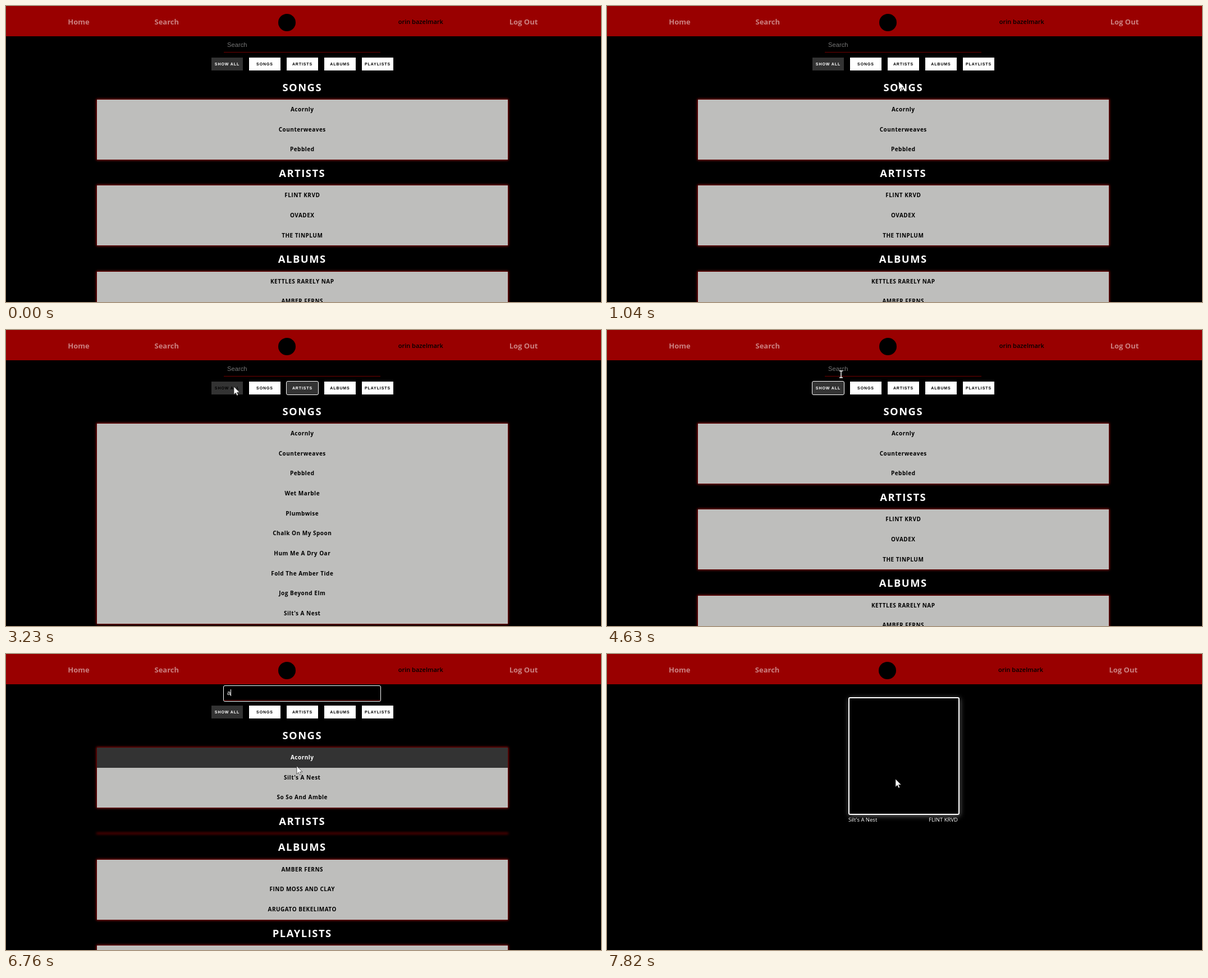
An HTML page for the animation above (8 s loop, 1060 by 528 pixels).

```html
<!DOCTYPE html>
<html lang="en">
<head>
<meta charset="utf-8">
<title>Music search</title>
<style>
  html, body { margin: 0; width: 100%; height: 100%; overflow: hidden; background: #000; }
  #stage { position: relative; width: 1060px; height: 528px; overflow: hidden; background: #000;
    color: #fff; font-family: "Open Sans", "Noto Sans", sans-serif; }
  #stage * { box-sizing: border-box; }
  [hidden] { display: none !important; }
  .abs, nav span, nav i, button, .view, .cursor { position: absolute; white-space: pre; }
  nav { position: absolute; width: 100%; height: 54px; background: #900; }
  nav span { top: 18px; line-height: 20px; font-size: 13px; font-weight: 700; color: rgba(255,255,255,.5); }
  nav .user { font-size: 11px; font-weight: 600; color: #000; }
  nav i { top: 14px; width: 31px; height: 31px; border-radius: 50%; background: #000; }
  #field { left: 388px; top: 57px; width: 279px; height: 27px; padding-left: 6px;
    font: 11.2px/24px "Liberation Sans", Arial, sans-serif; color: #757575; }
  #field::after { content: ""; position: absolute; left: 0; right: 0; top: 25px; height: 1px; background: #700000; }
  #caret { left: 6px; top: 6px; width: 1px; height: 12px; background: #fff; }
  button { top: 92px; width: 56px; height: 23px; padding: 0; border: 0; background: #fff; color: #000;
    font: 700 7px/22px "Liberation Sans", Arial, sans-serif; letter-spacing: .9px; text-align: center; }
  button.hover, button.active { background: #333; }
  button.active { color: #fff; }
  .focus { outline: 1px solid #fff; border-radius: 2px; }
  .view { left: 161.5px; top: 120.67px; width: 732.5px; text-align: center; }
  h2 { margin: 0; height: 46.33px; font-size: 18.4px; line-height: 47px; font-weight: 700; letter-spacing: 1.5px; }
  .list { background: #bebebc; color: #000; box-shadow: 0 0 4px 1px #900; }
  .row { height: 35.67px; line-height: 35.5px; font-size: 10px; font-weight: 700; letter-spacing: .5px; }
  .row.hover { background: #333; color: #fff; }
  #cover { left: 430px; top: 77px; width: 198px; height: 210px; border: 2px solid #fff; border-radius: 3px;
    box-shadow: 1px 2px 10px rgba(255,255,255,.4); }
  .caption { top: 289px; font-size: 9.5px; line-height: 14px; }
  .cursor { left: 0; top: 0; overflow: visible; }
</style>
</head>
<body>
<div id="stage">
  <nav>
    <span data-x="110.3">Home</span>
    <span data-x="264.5">Search</span>
    <i data-x="485"></i>
    <span class="user" data-x="698.7">orin bazelmark</span>
    <span data-x="896.7">Log Out</span>
  </nav>
  <div id="browse">
    <div id="field" class="abs"><span id="query">Search</span><b id="caret" class="abs"></b></div>
  </div>
  <div id="song">
    <div id="cover" class="abs"></div>
    <span class="abs caption" style="left:430px">Silt's A Nest</span>
    <span class="abs caption" style="right:435px">FLINT KRVD</span>
  </div>
  <svg id="arrow" class="cursor" width="12" height="18">
    <path d="M0 0V14.2L3.3 11.1 5.4 15.9 7.6 14.9 5.5 10.2H10Z" fill="#fff" stroke="#222" stroke-width=".7"/>
  </svg>
  <svg id="beam" class="cursor" width="1" height="1">
    <path d="M-3-6H3M0-6V6M-3 6H3" fill="none" stroke="#fff" stroke-width="1.4"/>
  </svg>
</div>
<script>
const LOOP = 8000, TOP = 167, ROW = 35.67, HEAD = 46.33;
const $ = id => document.getElementById(id);
const browse = $('browse');

function add(parent, tag, cls, text = '') {
  const el = document.createElement(tag);
  el.className = cls;
  el.textContent = text;
  parent.append(el);
  return el;
}

const songs = ['Acornly', 'Counterweaves', 'Pebbled', 'Wet Marble', 'Plumbwise', 'Chalk On My Spoon',
  'Hum Me A Dry Oar', 'Fold The Amber Tide', 'Jog Beyond Elm', "Silt's A Nest"];
const artists = ['FLINT KRVD', 'OVADEX', 'THE TINPLUM', 'MARROW & SIXPINS', 'TOBRINEL', 'HUSK PARADE ELEVEN',
  'QUILLO', 'DORVA LINT', 'SEVEN OF THIMBLE', 'NUBREK'];
const albums = ['KETTLES RARELY NAP', 'AMBER FERNS', 'FIND MOSS AND CLAY'];

const views = {
  all: { SONGS: songs.slice(0, 3), ARTISTS: artists.slice(0, 3), ALBUMS: albums },
  songs: { SONGS: songs },
  artists: { ARTISTS: artists },
  results: {
    SONGS: ['Acornly', "Silt's A Nest", 'So So And Amble'],
    ARTISTS: [],
    ALBUMS: ['AMBER FERNS', 'FIND MOSS AND CLAY', 'ARUGATO BEKELIMATO'],
    PLAYLISTS: ['']
  }
};

for (const name in views) {
  const el = add(browse, 'div', 'view');
  const rows = [];
  let y = TOP;
  for (const [title, items] of Object.entries(views[name])) {
    add(el, 'h2', '', title);
    const list = add(el, 'div', 'list');
    items.forEach((text, i) => rows.push({ el: add(list, 'div', 'row', text), y: y + i * ROW }));
    y += items.length * ROW + HEAD;
  }
  views[name] = { el, rows };
}

const buttons = ['SHOW ALL', 'SONGS', 'ARTISTS', 'ALBUMS', 'PLAYLISTS'].map((text, i) => {
  const el = add(browse, 'button', '', text), x = 366 + i * 67;
  el.style.left = x + 'px';
  return { el, x };
});

// Each entry holds from its time until the next one.
const viewAt = [[0, 'all'], [1770, 'songs'], [3290, 'artists'], [4180, 'all'], [6370, 'results'], [7500, 'song']];
const activeAt = [[0, 0], [1640, 1], [2660, 2], [3790, 0]];
const focusAt = [[0, -1], [1640, 1], [2660, 2], [3790, 0], [5050, 'field']];
const held = (steps, t) => steps.filter(s => s[0] <= t).pop()[1];

// Pointer path: time, x, y
const path = [[280, 988, 432], [400, 884, 305], [530, 783, 196], [700, 665, 164], [1040, 520, 135],
  [1500, 464, 99], [1770, 461, 97], [1990, 461, 97], [2480, 530, 102], [2800, 530, 102], [3230, 406, 101],
  [3470, 403, 99], [3610, 402, 98], [4180, 402, 98], [4630, 417, 79], [4980, 417, 69], [6370, 417, 69],
  [6760, 518, 200], [7130, 511, 211], [7440, 512, 213], [7820, 514, 223]];

function pointer(t) {
  const i = path.findIndex(p => p[0] > t);
  if (i < 0) return path[path.length - 1].slice(1);
  if (i === 0) return path[0].slice(1);
  const [a, b] = [path[i - 1], path[i]], k = (t - a[0]) / (b[0] - a[0]);
  return [a[1] + (b[1] - a[1]) * k, a[2] + (b[2] - a[2]) * k];
}

const within = (v, start, size) => v >= start && v < start + size;

function draw(t) {
  const view = held(viewAt, t), active = held(activeAt, t), focus = held(focusAt, t);
  const onSong = view === 'song', typed = t >= 5380;
  const shown = t >= 280 && !within(t, 5380, 990);
  const [x, y] = pointer(t);
  const over = (left, top, w, h) => shown && within(x, left, w) && within(y, top, h);

  browse.hidden = onSong;
  $('song').hidden = !onSong;
  // The header is laid out slightly narrower on the song screen.
  for (const el of document.querySelectorAll('[data-x]'))
    el.style.left = el.dataset.x * (onSong ? .9975 : 1) + 'px';

  for (const name in views) {
    const { el, rows } = views[name];
    el.hidden = name !== view;
    for (const r of rows) r.el.classList.toggle('hover', over(161.5, r.y, 732.5, ROW));
  }
  buttons.forEach((b, i) => {
    b.el.classList.toggle('active', i === active);
    b.el.classList.toggle('focus', i === focus);
    b.el.classList.toggle('hover', over(b.x, 92, 56, 23));
  });

  $('field').classList.toggle('focus', focus === 'field');
  $('query').textContent = typed ? 'a' : 'Search';
  $('query').style.color = typed ? '#fff' : '';
  $('caret').style.left = (typed ? 12 : 6) + 'px';
  $('caret').hidden = focus !== 'field' || (t > 5410 && Math.floor((t - 5410) / 530) % 2 === 1);

  const text = !onSong && over(388, 57, 279, 27);
  $('arrow').style.display = shown && !text ? '' : 'none';
  $('beam').style.display = text ? '' : 'none';
  $('arrow').style.transform = $('beam').style.transform = `translate(${x}px, ${y}px)`;
}

const start = performance.now();
function tick() {
  draw((performance.now() - start) % LOOP);
  requestAnimationFrame(tick);
}
tick();
</script>
</body>
</html>
```
